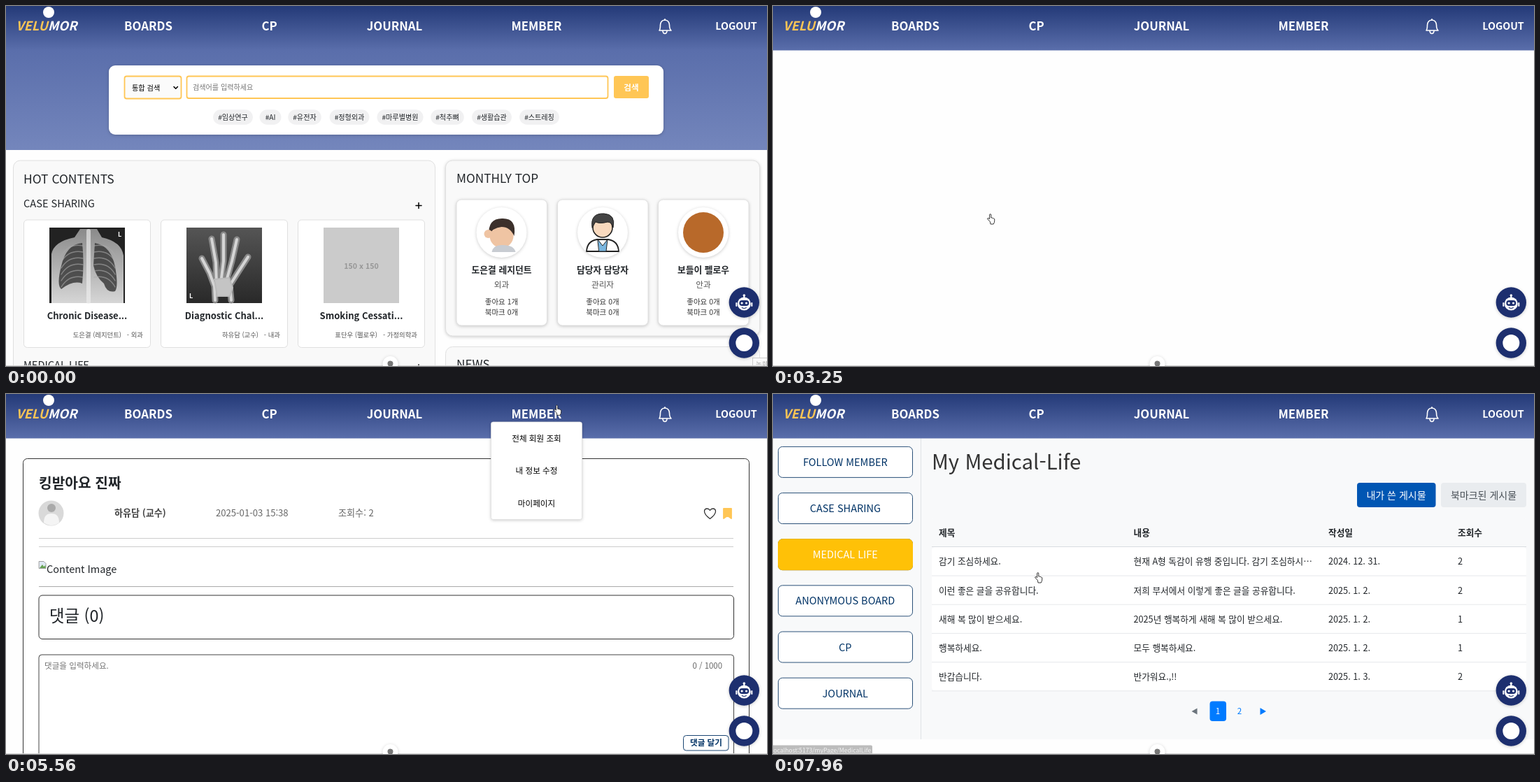
An HTML page that plays this animation: 1088x515 px, repeating every 8 s.

```html
<!DOCTYPE html>
<html lang="ko">
<head>
<meta charset="utf-8">
<title>Medical portal</title>
<style>
html, body { margin: 0; width: 100%; height: 100%; overflow: hidden; background: #fff; }
svg { display: block; width: 100%; height: 100%; }
text { font-family: "Noto Sans CJK KR", "Noto Sans CJK JP", "Noto Sans CJK", "Noto Sans", sans-serif; }
.shadow { filter: drop-shadow(0 1px 2px #0003); }
</style>
</head>
<body>
<svg id="stage" viewBox="0 0 1088 515"></svg>
<script>
const LOOP = 8000;
const INK = '#212529', NAVY = '#003366', GOLD = '#ffc655', AMBER = '#ffc107', LINK = '#0d6efd';

// Drawing helpers
const text = (x, y, s, size = 11.6, fill = INK, weight = 400, anchor = 'start') =>
  `<text x="${x}" y="${y}" font-size="${size}" fill="${fill}" font-weight="${weight}" text-anchor="${anchor}">${s}</text>`;
const mid = (x, y, s, size, fill, weight) => text(x, y, s, size, fill, weight, 'middle');
const rect = (x, y, w, h, fill, r = 0, stroke = 'none', sw = 1, more = '') =>
  `<rect x="${x}" y="${y}" width="${w}" height="${h}" fill="${fill}" rx="${r}" stroke="${stroke}" stroke-width="${sw}" ${more}/>`;
const circle = (x, y, r, fill, more = '') => `<circle cx="${x}" cy="${y}" r="${r}" fill="${fill}" ${more}/>`;
const path = (d, fill = 'none', stroke = 'none', sw = 1, more = '') =>
  `<path d="${d}" fill="${fill}" stroke="${stroke}" stroke-width="${sw}" stroke-linecap="round" stroke-linejoin="round" ${more}/>`;
const rule = (x1, x2, y, color, sw = 1) => rect(x1, y - sw / 2, x2 - x1, sw, color);
const at = (x, y, body) => `<g transform="translate(${x} ${y})">${body}</g>`;
const during = (spans, body) => `<g data-on="${spans}">${body}</g>`;
const list = (items, draw) => items.map(draw).join('');
const em = s => [...s].reduce((w, c) => w + (c > '가' ? .92 : c === ' ' ? .22 : .56), 0);
const pill = (x, y, s, size, h, pad, r, fill, weight) => {
  const w = em(s) * size + pad;
  return rect(x - w / 2, y - h / 2, w, h, fill, r) + mid(x, y + size * .37, s, size, INK, weight);
};

// People
const RESIDENT = '도은결', PROFESSOR = '하유담', FELLOW = '표단우';
const resident = `${RESIDENT} (레지던트)`, professor = `${PROFESSOR} (교수)`;

// Header
function menu(x, label, lit) {
  if (!lit) return mid(x, 35, label, 16.8, '#fff', 700);
  const [a, b] = lit;
  return during(`0-${a},${b}-${LOOP}`, mid(x, 35, label, 16.8, '#fff', 700)) +
    during(`${a}-${b}`, mid(x, 35, label, 16.8, GOLD, 700));
}
function dropdown(x, span, items) {
  return during(span, rect(x - 65, 40, 130, 139.5, '#fff', 3, '#ddd', .7, 'class="shadow"') +
    list(items, ([label, hover], i) => {
      const y = 40 + 46.5 * i;
      return mid(x, y + 27.5, label, 11.6, '#000') + (hover ? during(hover,
        rect(x - 64.5, y, 129, 46.5, GOLD) + mid(x, y + 27.5, label, 11.6, '#000', 700)) : '');
    }));
}
const header = () =>
  rect(0, 0, 1088, 63.5, 'url(#bar)') +
  circle(61, 9, 8, '#fff') +
  `<text x="58" y="34.5" font-size="18" font-weight="700" font-style="italic" text-anchor="middle" fill="${GOLD}">VELU<tspan fill="#fff">MOR</tspan></text>` +
  menu(203.5, 'BOARDS', [640, 1280]) + menu(376.5, 'CP') +
  menu(555.5, 'JOURNAL') + menu(758.5, 'MEMBER', [5600, 6540]) +
  path('M934 35 Q935.5 33 935.5 27 Q936 20.5 942 20 Q948 20.5 948.5 27 Q948.5 33 951 35 Z M942 20 V18.8 M939 36 Q939.5 39.5 942 39.5 Q944.5 39.5 945 36', 'none', '#fff', 1.6) +
  mid(1044, 33.5, 'LOGOUT', 14.3, '#fff', 700);

// Home
const chest = () => at(62, 317, rect(0, 0, 108, 108, '#222') +
  path('M3 108 V38 Q6 20 36 14 L44 2 H68 L75 14 Q103 20 106 40 V108 Z', 'url(#bone)') +
  path('M47 22 Q24 24 17 55 Q10 82 17 88 Q34 75 47 80 Q50 50 47 22 M65 22 Q88 26 94 56 Q99 84 94 91 Q82 94 78 80 Q66 70 63 54 Z', '#343434', 'none', 1, 'opacity=".8"') +
  list([0, 1, 2, 3, 4, 5], i => path(`M48 ${26 + i * 9} Q28 ${22 + i * 9} 17 ${40 + i * 9} M64 ${26 + i * 9} Q84 ${22 + i * 9} 94 ${40 + i * 9}`, 'none', '#aaa', 1.4, 'opacity=".6"')) +
  path('M56 5 V106', 'none', '#eee', 6, 'opacity=".65"') + text(98, 13, 'L', 9, '#fff', 700));
const hand = () => at(258, 317, rect(0, 0, 108, 108, 'url(#film)') +
  path('M41 104 L40 84 L33 65 L22 44 M43 82 L42 50 L36 16 M49 80 L53 48 L53 10 M56 80 L65 48 L72 17 M61 84 L75 62 L88 42 M64 104 L62 82', 'none', '#888', 9) +
  path('M41 104 L40 84 L33 65 L22 44 M43 82 L42 50 L36 16 M49 80 L53 48 L53 10 M56 80 L65 48 L72 17 M61 84 L75 62 L88 42 M64 104 L62 82', 'none', '#d5d5d5', 4) +
  path('M40 74 L61 72 L66 86 L62 98 H44 Z', '#c4c4c4', '#bbb', 2) + text(4, 101, 'L', 9, '#fff', 700));
const blank = () => rect(454, 317, 108, 108, '#cbcbcb') + mid(508, 376, '150 x 150', 10.6, '#969696', 700);

const avatars = [
  circle(0, 5, 17, '#efc4a3') + path('M-18 4 Q-20 -21 2 -20 Q22 -20 18 5 Q12 -8 0 -8 Q-13 -7 -18 4', '#3c302b') +
    path('M-14 28 Q-12 17 2 18 Q18 18 20 28 Z', '#c8ccd2') + circle(-19, 2, 6, '#efc4a3'),
  path('M-23 27 Q-22 12 -8 10 H8 Q22 12 23 27 Z', '#fff', '#222', 1.8) + path('M-7 10 L0 19 L7 10 L5 27 H-5 Z', '#7ab6df', '#222', 1) +
    circle(0, -7, 14, '#f8d9be', 'stroke="#222" stroke-width="1.6"') + path('M-15 -7 Q-18 -28 2 -27 Q19 -26 15 -7 Q13 -15 7 -15 Q-4 -12 -10 -15 Z', '#444', '#222'),
  circle(0, 0, 29, '#b8692a')
];
const stars = [[708.5, `${RESIDENT} 레지던트`, '외과', 1], [853, '담당자 담당자', '관리자', 0], [997, '보들이 펠로우', '안과', 0]];
const cases = [
  [25, 'Chronic Disease...', resident, '- 외과', 165], [221, 'Diagnostic Chal...', professor, '- 내과', 361],
  [417, 'Smoking Cessati...', `${FELLOW} (펠로우)`, '- 가정의학과', 531]
];
const tags = [[324.5, '임상연구'], [378, 'AI'], [427, '유전자'], [491, '정형외과'], [563.5, '마루별병원'], [631, '척추뼈'], [694.5, '생활습관'], [762.5, '스트레칭']];
const home = () =>
  rect(0, 63, 1088, 143, 'url(#hero)') +
  rect(147, 85, 793, 99, '#fff', 9, 'none', 0, 'class="shadow"') +
  rect(169.5, 100.5, 81, 32, '#fbfbfb', 3, GOLD, 1.8) + text(180, 120.5, '통합 검색', 10.2, '#000') +
  path('M240 115.5 l2.7 2.7 l2.7 -2.7', 'none', '#000', 1.6) +
  rect(258.5, 100.5, 602, 31.5, '#fff', 3, GOLD, 1.8) + text(267, 120, '검색어를 입력하세요', 10.1, '#757575') +
  rect(869, 100, 50, 32, GOLD, 3) + mid(894, 120.5, '검색', 11.6, '#fff', 700) +
  list(tags, ([x, s]) => pill(x, 159, '#' + s, 10.1, 21.5, 14, 10.7, '#f1f1f2', 400)) +
  rect(10.5, 221, 603, 320, '#f9f9f9', 10, '#e0e0e0') +
  text(25, 253.5, 'HOT CONTENTS', 17.4, INK, 500) + text(25, 288, 'CASE SHARING', 14.6, INK, 500) +
  text(25, 519, 'MEDICAL LIFE', 14.6, INK, 500) +
  list([285.5, 517], y => path(`M586 ${y} h8 M590 ${y - 4} v8`, 'none', '#000', 1.5)) +
  list(cases, ([x, title, who, dept, end]) => rect(x + .5, 306, 181, 182.5, '#fff', 5, '#dfdfdf') +
    mid(x + 91, 447.5, title, 13, INK, 700) + text(end, 473.5, who, 9.4, '#555', 400, 'end') +
    text(x + 171, 473.5, dept, 9.4, '#555', 400, 'end')) +
  chest() + hand() + blank() +
  rect(628.5, 221, 449, 251, '#f9f9f9', 10, '#e0e0e0', 1, 'class="shadow"') +
  text(644, 253, 'MONTHLY TOP', 17.2, INK, 500) +
  list(stars, ([x, name, dept, likes], i) => rect(x - 64.5, 277, 129.5, 180, '#fff', 7, '#e0e0e0', 1, 'class="shadow"') +
    circle(x, 324, 36, '#fff', 'class="shadow"') + at(x, 324, avatars[i]) +
    mid(x, 382, name, 12.8, INK, 700) + mid(x, 402.5, dept, 11.6, '#555') +
    mid(x, 427, `좋아요 ${likes}개`, 10.5, '#333') + mid(x, 442, '북마크 0개', 10.5, '#333')) +
  rect(628.5, 487.5, 449, 60, '#f9f9f9', 10, '#e0e0e0') + text(644, 518.5, 'NEWS', 17.2, INK, 500) +
  during('0-70', rect(1067.5, 503.5, 30, 20, '#fafafa', 0, '#ccc') + text(1072, 516, '녹화', 9.5, '#aaa'));

// Board
const posts = [
  [27, '반갑습니다.', '', 0, 3, 2], [29, '엑스레이사진입니다.', '방사선', 0, 3, 1], [30, '킹받아요 진짜', '', 1, 3, 1],
  [32, '행복하세요.', '사랑', 0, 3, 1], [33, 'gdgd', '', 1, 3, 1], [34, '안녕하세요.', '', 0, 3, 1],
  [21, '이런 좋은 글을 공유합니다.', '의사협회', 0, 2, 2], [22, '우리 모두 행복합니다.', '새해', 1, 2, 1], [23, '새해 복 많이 받으세요.', '2025년', 0, 2, 1]
];
const rowHover = ['2610-2870', '1480-2610,2870-3070', '3070-3250'];
const heads = ['등록 번호', '제목', '키워드', '작성자', '작성일', '조회수'];
const headRow = xs => list(heads, (s, i) => mid(xs[i], 195.5, s, 11.6, '#000', 700));
const navyButton = (x, y, w, s) => rect(x, y, w, 28, NAVY, 4) + mid(x + w / 2, y + 18, s, 10.6, '#fff', 500);
const board = () =>
  rect(0, 63.5, 147, 452, '#f8f8f8') + rect(146.5, 63.5, 1, 452, '#dedede') +
  text(7, 90, '부서 현황', 14.5, INK, 700) +
  list(['진료과', '간호부', '행정부', '의료기사', '약제부'], (s, i) => {
    const y = 118.5 + 28.9 * i;
    return path(`M16 ${y - 4} l4.5 4.5 l-4.5 4.5`, 'none', '#333', 1.1) + text(27, y + 4, s, 11.6, INK, 500);
  }) +
  text(156, 103, 'Medical Life', 17.5, INK, 700) +
  rect(460, 81.5, 367.5, 35.5, '#fff', 8, '#fbc531', 1.7) + text(475, 103, '검색어를 입력해 주세요.', 11.6, '#8a8a8a') +
  path('M807.5 100.5 l3.5 3.5', 'none', '#333', 2.2) + circle(804.5, 97.5, 3.8, '#5aaee8', 'stroke="#2e5f86" stroke-width="1.3"') +
  navyButton(1037, 85, 46, '글쓰기') + navyButton(1002, 128, 46, '최신순') + navyButton(1054, 128, 29, '10') +
  rule(162, 1077, 161.5, '#d3d6dc') + rect(156, 174, 927, 35, '#f8f9fa') + rule(156, 1083, 209, '#d5d8db') +
  during('940-1480', headRow([256.5, 415, 549, 701.5, 854, 1006.5]) + rule(162, 1077, 220.5, '#d3d6dc')) +
  during('1480-3250', headRow([212.5, 408, 611.5, 771.5, 932, 1040]) +
    list(posts, ([id, title, key, prof, day, views], i) => {
      const y = 209.3 + 35.2 * i, base = y + 21.7;
      return (rowHover[i] ? during(rowHover[i], rect(156, y, 927, 35, '#e9ebea')) : '') +
        rule(156, 1083, y + 35.2, '#dee2e6') + mid(212.5, base, id) + text(275, base, title, 11.6, LINK) +
        (key ? pill(610, y + 18, '# ' + key, 8.9, 15, 10, 3, AMBER, 700) : '') +
        mid(771.5, base, prof ? professor : resident) + mid(932, base, `2025. 1. ${day}.`) + mid(1040, base, views);
    }));

// Post
const flag = (fill, stroke) => path('M1026 164 H1037 V178 L1031.5 174 L1026 178 Z', fill, stroke, 1.8);
const post = () =>
  rect(24.5, 92.5, 1038, 450, '#fff', 6, '#333') + text(47, 135, '킹받아요 진짜', 20.3, INK, 700) +
  circle(64.5, 170.5, 18, '#d9d9d9') + circle(65, 163, 6, '#aaa') + path('M54 184 Q54 171 65 171 Q76 171 76 184 Q65 192 54 184', '#f4f4f4') +
  text(155, 175, professor, 13.1, '#444', 700) + text(300, 175, '2025-01-03 15:38', 13.1, '#666') + text(475, 175, '조회수: 2', 13.1, '#666') +
  path('M1006.5 178.5 Q998.5 172.5 998.5 168 Q998.5 164 1002.5 164 Q1005 164 1006.5 166.5 Q1008 164 1010.5 164 Q1014.5 164 1014.5 168 Q1014.5 172.5 1006.5 178.5 Z', 'none', '#333', 1.3) +
  during('3470-5150', flag('none', '#000')) + during('5150-5980', flag(GOLD, GOLD)) +
  rule(47, 1040, 206.5, '#ccc') + rule(47, 1040, 218.5, '#ccc') + rule(47, 1040, 275.5, '#aaa') +
  path('M47.5 239.5 H54 L57 242.5 V249.5 H47.5 Z', '#dfe8f4', '#888', .8) + path('M48 249 L52 244 L54 247 L56.5 245 V249 Z', '#67a353') +
  text(58, 256, 'Content Image', 14.5) +
  rect(47, 288, 993.5, 62.5, '#fff', 5, '#333') + text(62, 325.5, '댓글 (0)', 23.4, INK, 400) +
  rect(47, 373, 993.5, 180, '#fff', 4, '#444') + text(55, 393, '댓글을 입력하세요.', 11.6, '#757575') +
  text(1024, 392.5, '0 / 1000', 11.4, '#666', 400, 'end') +
  rect(968.5, 488.5, 64.5, 21.5, '#fff', 4, '#1b4673') + mid(1001, 503.3, '댓글 달기', 11.6, NAVY, 700);
const notice = () =>
  path('M384.5 0 H704 V90 Q704 98 696 98 H392 Q384.5 98 384.5 90 Z', '#fff', '#ddd', .6, 'class="shadow"') +
  text(399, 22, 'localhost:5173 내용:', 11, '#1f1f1f', 500) + text(399, 45, '북마크가 추가되었습니다.', 9.6, '#444') +
  rect(643, 65, 47, 23, '#0b57d0', 11.5) + mid(666.5, 80.5, '확인', 9.6, '#fff', 500);

// My page
const tabs = [['FOLLOW MEMBER', '5980-7270'], ['CASE SHARING'], ['MEDICAL LIFE', '7140-8000'], ['ANONYMOUS BOARD', '6895-7060'], ['CP'], ['JOURNAL']];
const mine = [
  ['감기 조심하세요.', '현재 A형 독감이 유행 중입니다. 감기 조심하시⋯', '2024. 12. 31.', 2],
  ['이런 좋은 글을 공유합니다.', '저희 부서에서 이렇게 좋은 글을 공유합니다.', '2025. 1. 2.', 2],
  ['새해 복 많이 받으세요.', '2025년 행복하게 새해 복 많이 받으세요.', '2025. 1. 2.', 1],
  ['행복하세요.', '모두 행복하세요.', '2025. 1. 2.', 1], ['반갑습니다.', '반가워요.,!!', '2025. 1. 3.', 2]
];
const cells = (row, y, weight) => list(row, (s, i) => text([237, 515.5, 794, 979][i], y, s, 12.7, INK, weight));
const tab = (y, s, fill, stroke, ink) => rect(7.5, y, 192, 44, fill, 6, stroke) + mid(103.3, y + 27.5, s, 14.5, ink);
const myPage = () =>
  during('5980-7270', rect(0, 63.5, 211, 420, '#f8f9fb')) +
  during('7270-8000', rect(0, 63.5, 1088, 430.5, '#f8f9fa')) +
  rect(211, 63.5, 1, 420, '#dfe2e6') +
  list(tabs, ([s, lit], i) => {
    const y = 75.4 + 66.15 * i;
    return tab(y, s, '#fff', '#2a5078', NAVY) + (lit ? during(lit, tab(y, s, AMBER, AMBER, '#fff')) : '');
  }) +
  during('5980-7270', text(300, 118, '내가 팔로우한 사용자', 20.4, INK, 700)) +
  during('7270-8000', rect(211, 483, 1, 11, '#dfe2e6') + text(227, 107.5, 'My Medical-Life', 29.4, '#333', 500) +
    rect(835, 127, 112.5, 35, '#0056b3', 4) + mid(891, 149.7, '내가 쓴 게시물', 14, '#fff', 500) +
    rect(955, 127, 122, 35, '#e9ecef', 4) + mid(1016, 149.7, '북마크된 게시물', 14, '#495057') +
    rect(227, 177, 850, 41.5, '#f8f9fa', 6) + cells(['제목', '내용', '작성일', '조회수'], 202.5, 700) + rule(227, 1077, 218.5, '#d9dce0')) +
  during('7400-8000', rect(227, 219, 850, 205.5, '#fff', 5) +
    list(mine, (row, i) => cells(row, 244.2 + 41.3 * i, 400) + rule(227, 1077, 260 + 41.2 * i, '#e6e8eb')) +
    path('M598.5 454 l8 -4.6 v9.2 Z', '#6c757d') + rect(624.5, 439.5, 23.5, 28.5, '#007bff', 4) +
    mid(636, 458.2, '1', 11.6, '#fff') + mid(667, 458.2, '2', 11.6, '#007bff') + path('M705 454 l-8.5 -5 v10 Z', '#007bff')) +
  during('7340-8000', rect(-5, 502.5, 147, 20, '#bcbcbc', 2) + text(-2, 512.5, 'localhost:5173/myPage/MedicalLife', 8.6, '#f2f2f2'));

// Floating buttons
const floating = () =>
  rule(0, 1088, 514.5, '#d8d8d8') + circle(549.5, 512, 11, '#fff', 'class="shadow"') + circle(549.5, 511.5, 4, '#777') +
  list([424, 482], y => circle(1055.3, y, 21.7, '#1d2f6f', 'class="shadow"')) +
  at(1055.3, 424, path('M-11 1 v4 M11 1 v4 M0 -10 v4', 'none', '#fff', 2) + circle(0, -10, 1.8, '#fff') +
    circle(0, 2, 9.5, '#fff') + rect(-7, -3, 14, 8, '#1d2f6f', 4) +
    circle(-3.2, 1, 1.6, '#fff') + circle(3.2, 1, 1.6, '#fff') + path('M-3 7.5 Q0 9.5 3 7.5', 'none', '#1d2f6f', 1.2)) +
  circle(1055.3, 482, 12, '#fff');

const pointers = {
  arrow: path('M0 0 V10.5 L2.4 8.4 L4.2 12 L5.8 11.2 L4.2 7.8 H7.2 Z', '#fff', '#222', .9),
  hand: path('M1 10 L-2.4 6.8 Q-2.4 5 -.8 5.6 L.6 6.8 V1 Q.6 -.4 1.7 -.4 Q2.8 -.4 2.8 1 V5 Q4.6 4.3 4.8 5.5 Q6.2 5 6.5 6.2 Q8 6 7.8 8 Q8 11.5 6.2 14 H2.4 Z', '#fff', '#222', .9),
  beam: path('M-2 -5 Q0 -5 0 -3.5 Q0 -5 2 -5 M0 -3.5 V3.5 M-2 5 Q0 5 0 3.5 Q0 5 2 5', 'none', '#333', 1)
};
const gradient = (id, a, b) => `<linearGradient id="${id}" x2="0" y2="1"><stop stop-color="${a}"/><stop offset="1" stop-color="${b}"/></linearGradient>`;

const stage = document.getElementById('stage');
stage.innerHTML =
  `<defs>${gradient('bar', '#243a78', '#5a6eab')}${gradient('hero', '#5a6eab', '#7486bc')}${gradient('bone', '#8a8a8a', '#d6d6d6')}${gradient('film', '#555', '#292929')}</defs>` +
  rect(0, 0, 1088, 515, '#fefefe') +
  during('0-940', home()) + during('940-3250', board()) + during('3470-5980', post()) + during('5980-8000', myPage()) +
  header() +
  dropdown(203.5, '640-1080', [['CASE SHARING', '720-790'], ['MEDICAL LIFE', '790-1010'], ['익명 게시판']]) +
  dropdown(758.5, '5480-6530', [['전체 회원 조회', '5650-5730'], ['내 정보 수정', '5730-5850'], ['마이페이지', '5850-6510']]) +
  floating() + during('4340-5150', notice()) +
  `<g id="cursor">${Object.entries(pointers).map(([k, d]) => `<g data-pointer="${k}">${d}</g>`).join('')}</g>`;

// time, x, y, pointer from then on
const track = [
  [70, 1076, 480, 'arrow'], [300, 820, 300, 'arrow'], [540, 400, 110, 'arrow'], [670, 215, 40, 'hand'], [870, 200, 112, 'hand'],
  [940, 200, 112, 'hand'], [1020, 290, 160, 'arrow'], [1210, 524, 248, 'arrow'], [1400, 470, 267, 'arrow'], [1550, 433, 272, 'arrow'],
  [1820, 433, 272, 'arrow'], [2230, 439, 274, 'arrow'], [2420, 439, 274, 'arrow'], [2600, 345, 246, 'beam'], [2690, 315, 234, 'beam'],
  [2850, 302, 240, 'beam'], [3180, 309, 298, 'hand'], [3470, 309, 298, 'arrow'], [3800, 750, 215, 'arrow'], [4070, 1023, 171, 'hand'],
  [4270, 1027, 170, 'hand'], [4340, 1026, 171, 'arrow'], [4560, 960, 187, 'arrow'], [5100, 668, 78, 'arrow'], [5150, 668, 78, 'arrow'],
  [5350, 715, 40, 'arrow'], [5560, 786, 16, 'hand'], [5700, 772, 70, 'hand'], [5910, 753, 146, 'hand'], [6460, 753, 146, 'hand'],
  [6560, 690, 165, 'arrow'], [6895, 195, 290, 'hand'], [7050, 150, 275, 'hand'], [7200, 120, 234, 'hand'], [7270, 120, 234, 'hand'],
  [7500, 200, 242, 'hand'], [7960, 377, 256, 'hand']
];
const cursor = document.getElementById('cursor');
const pointerNodes = [...cursor.children];
const timed = [...stage.querySelectorAll('[data-on]')].map(node =>
  ({ node, spans: node.dataset.on.split(',').map(s => s.split('-').map(Number)) }));

function render(t) {
  for (const { node, spans } of timed)
    node.style.display = spans.some(([a, b]) => t >= a && t < b) ? '' : 'none';
  cursor.style.display = t < track[0][0] ? 'none' : '';
  const i = Math.max(0, track.findLastIndex(k => k[0] <= t));
  const [t0, x0, y0, kind] = track[i];
  const [t1, x1, y1] = track[i + 1] || [LOOP + 1, x0, y0];
  const p = Math.max(0, (t - t0) / (t1 - t0));
  cursor.setAttribute('transform', `translate(${x0 + (x1 - x0) * p} ${y0 + (y1 - y0) * p})`);
  for (const n of pointerNodes) n.style.display = n.dataset.pointer === kind ? '' : 'none';
}
const start = performance.now();
function tick() {
  render((performance.now() - start) % LOOP);
  requestAnimationFrame(tick);
}
tick();
</script>
</body>
</html>
```
